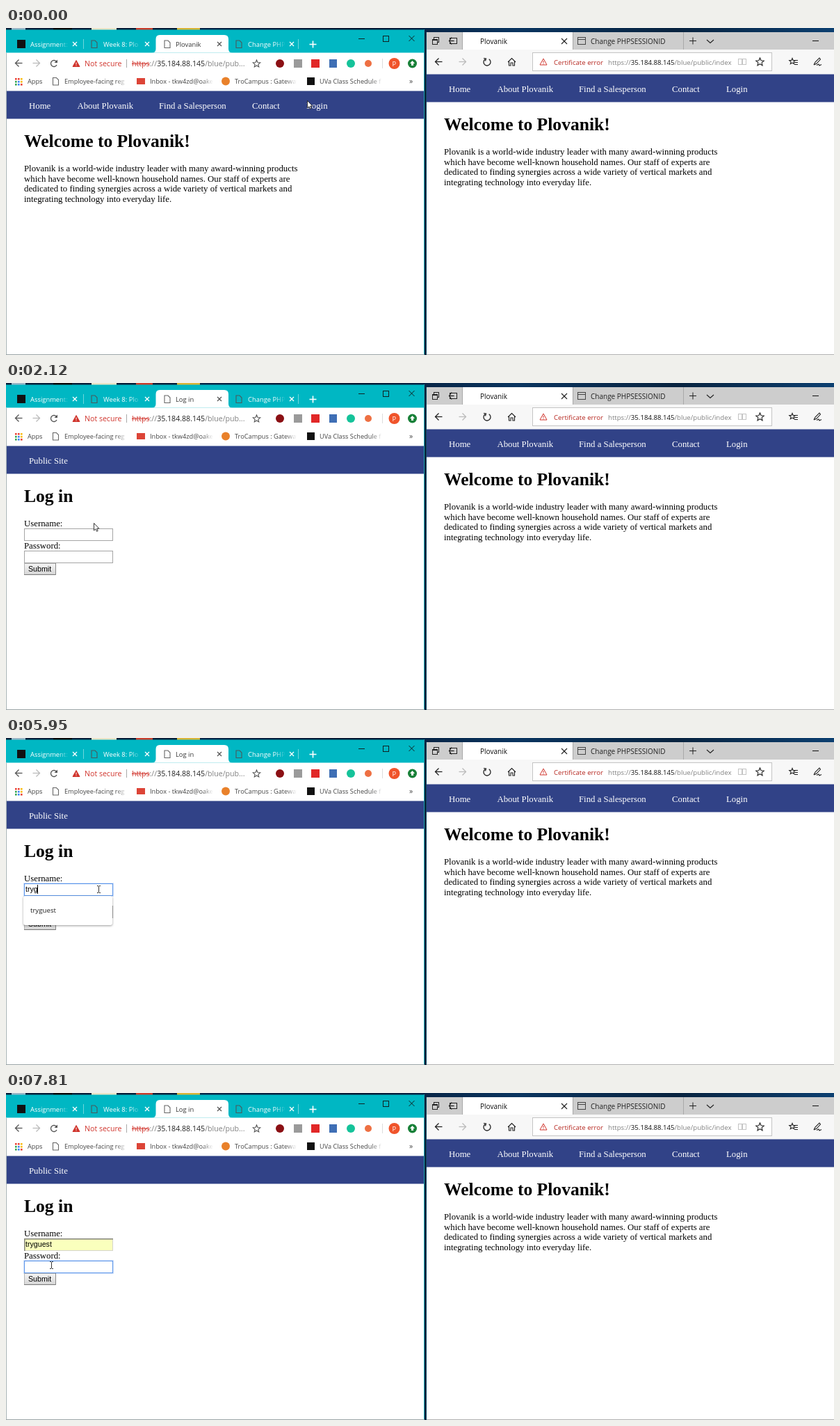
Animation of 1191x470 px, one loop 8 s. Source, as an HTML page with a canvas:

```html
<!DOCTYPE html>
<html lang="en">
<head>
<meta charset="utf-8">
<title>Two browsers</title>
<style>
html, body { margin: 0; width: 100%; height: 100%; overflow: hidden; background: #fff; }
canvas { display: block; }
</style>
</head>
<body>
<canvas id="stage" width="1191" height="470"></canvas>
<script>
const ctx = document.getElementById('stage').getContext('2d');
const LOOP = 8000;
const SERIF = '"Liberation Serif", serif';
const ARIAL = '10.67px "Liberation Sans", sans-serif';
const ui = size => size + 'px "Open Sans", sans-serif';
const TEAL = '#00b7c3', NAVY = '#314287', RED = '#d0342c', DARK = '#444', GREY = '#808080';
const BRAND = 'Plovanik', USER = 'tryguest';
const SUGGESTIONS = ['mfsample', 'vlmzcountess', "a'or'1'='1", USER, "'OR 1-- -' OR 1 OR '1\" OR 1 OR\"", 'admin'];

// time, x, y, I-beam flag
const POINTER = [
  [0, 433, 104], [120, 474, 103], [260, 483, 110], [380, 468, 117], [510, 455, 119], [760, 457, 121],
  [910, 425, 230], [1030, 382, 364], [1190, 271, 452], [1330, 144, 199], [1460, 352, 281],
  [1610, 265, 231], [1730, 189, 279], [1880, 150, 245], [2000, 120, 214], [2120, 126, 201],
  [2260, 149, 206], [2390, 143, 216, 1], [2540, 133, 217, 1], [6070, 112, 232], [6200, 92, 240],
  [6350, 84, 243], [6500, 79, 245], [6750, 80, 247, 1], [6900, 74, 247, 1], [7020, 69, 247, 1], [7140, 65, 247, 1]
];

const box = (x, y, w, h, color) => { ctx.fillStyle = color; ctx.fillRect(x, y, w, h); };
const frame = (x, y, w, h, color) => { ctx.strokeStyle = color; ctx.lineWidth = 1; ctx.strokeRect(x + .5, y + .5, w - 1, h - 1); };
const dot = (x, y, r, color) => { ctx.fillStyle = color; ctx.beginPath(); ctx.arc(x, y, r, 0, 7); ctx.fill(); };

function text(s, x, y, font, color) {
  ctx.font = font;
  ctx.fillStyle = color;
  ctx.fillText(s, x, y);
  return x + ctx.measureText(s).width;
}

function fadeText(s, x, y, font, color, end) {
  const g = ctx.createLinearGradient(end - 16, 0, end, 0);
  g.addColorStop(0, color);
  g.addColorStop(1, color + '00');
  text(s, x, y, font, g);
}

function path(points, color, width = 1, close = false, fill) {
  ctx.beginPath();
  points.forEach(([x, y], i) => i ? ctx.lineTo(x, y) : ctx.moveTo(x, y));
  if (close) ctx.closePath();
  if (fill) { ctx.fillStyle = fill; ctx.fill(); }
  if (!color) return;
  ctx.strokeStyle = color;
  ctx.lineWidth = width;
  ctx.stroke();
}

function cross(x, y, r, color, w = 1) {
  path([[x - r, y - r], [x + r, y + r]], color, w);
  path([[x + r, y - r], [x - r, y + r]], color, w);
}

function plus(x, y, r, color, w = 1) {
  path([[x - r, y], [x + r, y]], color, w);
  path([[x, y - r], [x, y + r]], color, w);
}

function arrow(x, y, dir, color) {
  path([[x - 5 * dir, y], [x + 5 * dir, y]], color, 1.3);
  path([[x, y - 5], [x - 5 * dir, y], [x, y + 5]], color, 1.3);
}

function arc(x, y, r, from, to, color, w = 1.3) {
  ctx.strokeStyle = color;
  ctx.lineWidth = w;
  ctx.beginPath();
  ctx.arc(x, y, r, from, to);
  ctx.stroke();
}

function reload(x, y, color) {
  arc(x, y, 4.5, .5, 5.6, color);
  path([[x + 5, y - 5.5], [x + 5, y - 1], [x + .5, y - 1]], null, 1, true, color);
}

function star(x, y, r, color) {
  const pts = Array.from({ length: 10 }, (_, i) => {
    const a = i * Math.PI / 5 - Math.PI / 2, d = i % 2 ? r * .45 : r;
    return [x + d * Math.cos(a), y + d * Math.sin(a)];
  });
  path(pts, color, 1.1, true);
}

const page = (x, y, color) =>
  path([[x, y - 5], [x + 5, y - 5], [x + 8, y - 2], [x + 8, y + 5.5], [x, y + 5.5]], color, 1.1, true);

function warning(x, y, solid) {
  path([[x, y - 5], [x + 5, y + 4], [x - 5, y + 4]], RED, 1, true, solid && RED);
  box(x - .5, y - 2, 1, 3, solid ? '#fff' : RED);
  box(x - .5, y + 2, 1, 1, solid ? '#fff' : RED);
}

function desktop() {
  box(0, 0, 1191, 470, '#08203a');
  const g = ctx.createLinearGradient(280, 0, 1191, 0);
  ['#08284a', '#061a34', '#0a3560', '#08233f', '#0c3f70'].forEach((c, i) => g.addColorStop(i / 4, c));
  box(280, 0, 911, 7, g);
  box(8, 0, 20, 3, '#9bb8c8');
  box(68, 0, 27, 3, '#0a0a0a');
  box(123, 0, 36, 3, '#e9e4c8');
  box(187, 0, 24, 3, '#c8402f');
  box(246, 0, 33, 3, '#d8b53a');
}

function tabs(title, loading) {
  box(0, 2.5, 602, 33, TEAL);
  ctx.fillStyle = '#fff';
  ctx.beginPath();
  ctx.moveTo(210, 35.5);
  ctx.quadraticCurveTo(215.5, 35.5, 215.5, 30);
  ctx.lineTo(215.5, 16);
  ctx.quadraticCurveTo(215.5, 10, 221, 10);
  ctx.lineTo(314, 10);
  ctx.quadraticCurveTo(320, 10, 320, 16);
  ctx.lineTo(320, 30);
  ctx.quadraticCurveTo(320, 35.5, 325.5, 35.5);
  ctx.fill();

  box(16, 17, 12, 12, '#111');
  page(123, 23, '#4a5a5c');
  page(331, 23, '#4a5a5c');
  if (loading) arc(232, 23, 4.5, -1.5, 2.6, '#4285f4', 1.5);
  else page(228, 23, '#666');
  const font = ui(9.4);
  fadeText('Assignment:', 35, 27, font, '#ffffff', 91);
  fadeText('Week 8: ' + BRAND.slice(0, 3), 140, 27, font, '#ffffff', 194);
  text(title, 244, 27, font, '#333');
  fadeText('Change PHP', 348, 27, font, '#ffffff', 402);
  [99, 203, 411].forEach(x => cross(x, 23, 3, '#fff', 1.2));
  cross(307, 23, 3, '#555', 1.2);
  [111, 420].forEach(x => box(x, 16, 1, 14, '#6fd6dc'));
  plus(441.5, 23.5, 5, '#fff', 1.6);
  box(507, 15, 9, 1, '#122');
  frame(542, 11, 9, 9, '#122');
  cross(583.5, 15, 4, '#122');
}

function toolbar(loading) {
  arrow(18.5, 50.5, 1, '#555');
  arrow(43.5, 50.5, -1, '#bbb');
  if (loading) cross(69.5, 50.5, 4.5, '#555', 1.4);
  else reload(69, 51, '#555');
  warning(101, 51.5, true);
  const font = ui(10.6);
  text('Not secure', 113, 55, font, RED);
  box(173, 45, 1, 12, '#aaa');
  let x = text('https', 181, 55, font, RED);
  box(181, 51, x - 181, 1, RED);
  x = text('://', x, 55, font, GREY);
  x = text('35.184.88.145', x, 55, font, '#222');
  text('/blue/pub...', x, 55, font, GREY);
  star(360.5, 51.5, 5.5, '#555');

  dot(394, 51, 6, '#8b1014');
  box(414, 45, 12, 12, '#9a9a9a');
  box(439, 45, 12, 12, '#e12828');
  box(465, 45, 11, 12, '#3f6fb5');
  dot(496, 51, 6, '#15c39a');
  dot(521, 51, 5, '#ee7043');
  box(541, 44, 1, 14, '#ddd');
  dot(558.5, 51, 8, '#f0542b');
  text('P', 555.5, 54.5, ui(9.4), '#fff');
  dot(584.5, 51, 6.5, '#188038');
  path([[584.5, 47], [588, 51], [586, 51], [586, 54], [583, 54], [583, 51], [581, 51]], null, 1, true, '#fff');

  const colors = ['#ea4335', '#ea4335', '#fbbc05', '#34a853', '#4285f4', '#fbbc05', '#34a853', '#4285f4', '#ea4335'];
  colors.forEach((c, i) => box(13 + i % 3 * 4, 72 + Math.floor(i / 3) * 4, 2.6, 2.6, c));
  const small = ui(9.2);
  text('Apps', 31, 80, small, DARK);
  page(67.5, 76.5, '#666');
  fadeText('Employee-facing reg', 84, 80, small, '#444444', 174);
  box(188, 72, 12, 9, '#dc4437');
  fadeText('Inbox - tkw4zd@oake', 207, 80, small, '#444444', 298);
  dot(316, 76.5, 6, '#e9812b');
  fadeText('TroCampus : Gateway', 329, 80, small, '#444444', 418);
  box(433, 71, 11, 11, '#111');
  fadeText('UVa Class Schedule f', 451, 80, small, '#444444', 541);
  text('»', 580, 80, ui(10.6), DARK);
}

function navBar(x, y, w, links) {
  box(x, y - .5, w, 40, NAVY);
  links.forEach(([label, dx]) => text(label, x + dx, y + 25, '12.8px ' + SERIF, '#fff'));
}

const heading = (s, x, y) => text(s, x, y, 'bold 25.6px ' + SERIF, '#000');
const body = (s, x, y) => text(s, x, y, '12.8px ' + SERIF, '#000');

function welcome(x, y, w) {
  navBar(x, y, w, [['Home', 33], ['About ' + BRAND, 102.4], ['Find a Salesperson', 220], ['Contact', 354], ['Login', 432]]);
  heading('Welcome to ' + BRAND + '!', x + 26, y + 80);
  [BRAND + ' is a world-wide industry leader with many award-winning products',
    'which have become well-known household names. Our staff of experts are',
    'dedicated to finding synergies across a wide variety of vertical markets and',
    'integrating technology into everyday life.'
  ].forEach((s, i) => body(s, x + 26, y + 115 + Math.round(i * 14.6)));
}

function field(y, { focus, filled, value = '', caret }) {
  box(26, y, 128, 18, filled ? '#faffbd' : '#fff');
  if (filled) {
    frame(26, y, 128, 18, '#d5d5cc');
    box(26, y, 128, 1.6, '#8a8a80');
    box(26, y, 1.6, 18, '#8a8a80');
  } else {
    frame(26, y, 128, 18, '#a5a5a5');
  }
  if (focus) {
    frame(25, y - 1, 130, 20, 'rgba(91,149,234,.25)');
    frame(26, y, 128, 18, '#5b95ea');
  }
  const end = text(value, 28, y + 12, ARIAL, '#000');
  if (caret) box(Math.floor(end), y + 2, 1, 13, '#000');
}

function popup(w, h, items, hover) {
  ctx.save();
  ctx.shadowColor = 'rgba(0,0,0,.4)';
  ctx.shadowBlur = 3;
  ctx.shadowOffsetY = 1;
  ctx.fillStyle = '#fff';
  ctx.beginPath();
  ctx.roundRect(25, 227, w, h, 3);
  ctx.fill();
  ctx.restore();
  if (hover) box(25, 233, w, 29, '#e8e8ea');
  items.forEach((s, i) => text(s, 35, 251 + Math.round(i * 28.6), ui(9.7), '#222'));
}

function login(t) {
  navBar(0, 91, 601, [['Public Site', 33]]);
  heading('Log in', 26, 171);
  body('Username:', 26, 206);
  body('Password:', 26, 238);

  const within = (a, b) => t >= a && t < b;
  const filled = t >= 6350;
  const typed = [4360, 4610, 4750, 4870].filter(k => t >= k).length;
  field(209, {
    focus: within(2820, 7290),
    filled,
    value: USER.slice(0, filled ? 8 : typed),
    caret: within(2820, 3400) || within(3930, 5400) || within(5950, 6350) || within(6750, 7290)
  });
  field(241, { focus: t >= 7290, caret: within(7290, 7810) });

  const g = ctx.createLinearGradient(0, 259, 0, 276);
  g.addColorStop(0, '#f6f6f6');
  g.addColorStop(1, '#d4d4d4');
  box(26, 259, 46, 17, g);
  frame(26, 259, 46, 17, '#b4b4b4');
  box(26, 275, 46, 1, '#777');
  box(71, 259, 1, 17, '#888');
  text('Submit', 32, 271, ARIAL, '#000');

  if (within(2970, 4490)) popup(191, 184, SUGGESTIONS);
  else if (within(4490, 6750)) popup(128, 42, [USER], filled);
}

function rightWindow() {
  box(605, 6, 586, 464, '#fff');
  box(605, 6, 586, 25, '#cdcdcd');
  box(656, 6, 159, 25, '#fff');
  [656, 815, 974].forEach(x => box(x, 6, 1, 25, '#a9a9a9'));
  frame(615, 13, 8, 8, '#222');
  box(613, 16, 8, 8, '#cdcdcd');
  frame(613, 16, 8, 8, '#222');
  box(613, 16, 8, 2, '#222');
  frame(638, 14, 11, 9, '#222');
  box(636, 16, 5, 5, '#cdcdcd');
  arrow(641, 18.5, .7, '#222');
  text(BRAND, 682, 22.5, ui(10), '#111');
  cross(803, 19, 4, '#222', 1.1);
  frame(822, 13, 12, 11, '#444');
  box(822, 16, 12, 1, '#444');
  text('Change PHPSESSIONID', 841, 22.5, ui(10), '#222');
  plus(988, 18.5, 5, '#222');
  path([[1008, 17], [1013, 21.5], [1018, 17]], '#222', 1.1);
  box(1160, 18, 9, 1, '#111');

  box(605, 31, 586, 36, '#f7f7f7');
  arrow(622.5, 48.5, 1, '#222');
  arrow(656.5, 48.5, -1, '#bbb');
  arc(692, 49, 5, -1, 4.2, '#222');
  path([[687, 43.5], [690.5, 44], [689.5, 47.5]], '#222', 1.2);
  path([[722, 49], [727.5, 43.5], [733, 49]], '#222', 1.2);
  path([[723.5, 48], [723.5, 54], [726, 54], [726, 50], [729, 50], [729, 54], [731.5, 54], [731.5, 48]], '#222', 1.1);
  box(757, 35, 345, 27, '#fff');
  frame(757, 35, 345, 27, '#c4c4c4');
  warning(773, 49, false);
  const font = ui(9.65);
  text('Certificate error', 788, 52.5, font, '#b5261e');
  ctx.save();
  ctx.beginPath();
  ctx.rect(866, 36, 178, 24);
  ctx.clip();
  let x = text('https://', 866, 52.5, font, GREY);
  x = text('35.184.88.145', x, 52.5, font, '#111');
  text('/blue/public/index', x, 52.5, font, GREY);
  ctx.restore();
  frame(1053, 44, 6, 9, '#c4c4c4');
  frame(1059, 44, 6, 9, '#c4c4c4');
  star(1084.5, 49, 6, '#222');
  star(1131, 48, 4.5, '#222');
  [46, 49, 52].forEach(y => box(1134, y, 5, 1, '#222'));
  path([[1162, 53], [1164, 49], [1170, 43], [1171.5, 45], [1166, 51], [1162, 53]], '#222', 1.1);
  path([[1166, 53.5], [1169, 52], [1170, 54], [1173, 52.5]], '#222', 1.1);

  welcome(604, 67, 587);
}

function pointer(t) {
  const [, x, y, beam] = POINTER.findLast(p => p[0] <= t);
  if (beam) {
    box(x, y - 4, 1, 9, '#333');
    [[-2, -5], [1, -5], [-2, 5], [1, 5]].forEach(([dx, dy]) => box(x + dx, y + dy, 2, 1, '#333'));
    return;
  }
  const shape = [[0, 0], [0, 10.5], [2.4, 8.3], [4, 11.8], [5.7, 11], [4.2, 7.7], [7.4, 7.7]];
  path(shape.map(([dx, dy]) => [x + .5 + dx, y + .5 + dy]), '#222', .9, true, '#fff');
}

function draw(t) {
  const loggingIn = t >= 910, loading = t >= 760 && t < 1030;
  desktop();
  box(0, 35, 602, 435, '#fff');
  tabs(loggingIn ? 'Log in' : BRAND, loading);
  toolbar(loading);
  if (loggingIn) login(t);
  else welcome(0, 91, 601);
  box(0, 36, 1, 434, '#a8b4b6');
  box(601, 2, 1, 468, '#1aa5b0');
  rightWindow();
  box(604, 6, 1, 464, '#0c4a60');
  box(0, 469, 602, 1, '#9aa4a6');
  box(605, 469, 586, 1, '#b0b0b0');
  pointer(t);
}

const start = performance.now();
function tick() {
  draw((performance.now() - start) % LOOP);
  requestAnimationFrame(tick);
}
tick();
</script>
</body>
</html>
```
